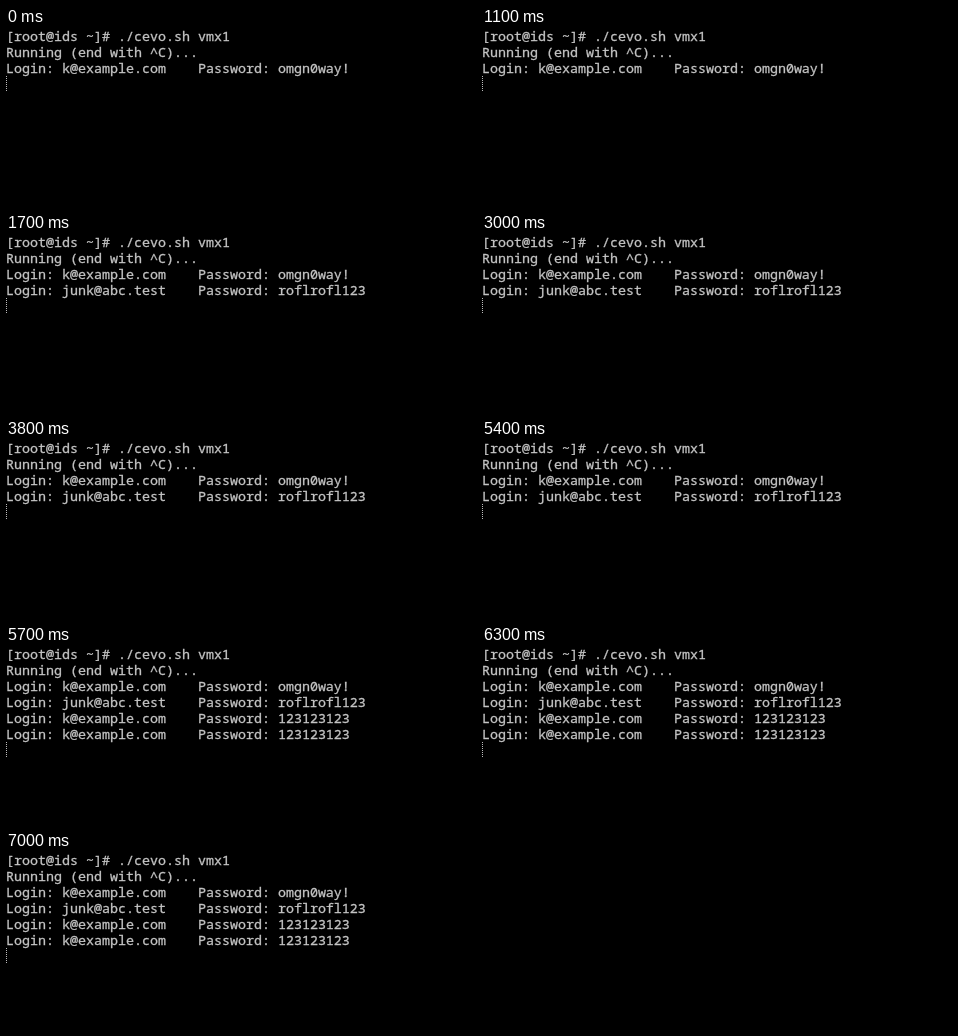
Animation, 470 px wide and 178 px high, one loop 7.1 s. Source, as an HTML page:

```html
<!DOCTYPE html>
<html lang="en">
<head>
<meta charset="utf-8">
<title>Terminal</title>
<style>
  html, body { margin: 0; width: 100%; height: 100%; overflow: hidden; background: #000; }
  svg { display: block; width: 470px; height: 178px; }
  text {
    font: 13.333px "Noto Sans Mono", "Liberation Mono", monospace;
    font-variant-ligatures: none;
    white-space: pre;
    fill: #c4c4c4;
    stroke: #c4c4c4;
    stroke-width: .3px;
  }
  .second { animation: second 7.1s step-end infinite; }
  .last { animation: last 7.1s step-end infinite; }
  .cursor { stroke: #bbb; stroke-dasharray: 1 1; animation: cursor 7.1s step-end infinite; }

  @keyframes second {
    0% { visibility: hidden; }
    23.94%, 100% { visibility: visible; }
  }
  @keyframes last {
    0% { visibility: hidden; }
    80.28%, 100% { visibility: visible; }
  }
  /* The cursor drops below the newest line. */
  @keyframes cursor {
    0% { transform: translateY(48px); }
    23.94% { transform: translateY(64px); }
    80.28%, 100% { transform: translateY(96px); }
  }
</style>
</head>
<body>
<svg viewBox="0 0 470 178">
  <text y="13">[root@ids ~]# ./cevo.sh vmx1</text>
  <text y="29">Running (end with ^C)...</text>
  <text y="45">Login: k@example.com    Password: omgn0way!</text>
  <text y="61" class="second">Login: junk@abc.test    Password: roflrofl123</text>
  <g class="last">
    <text y="77">Login: k@example.com    Password: 123123123</text>
    <text y="93">Login: k@example.com    Password: 123123123</text>
  </g>
  <line class="cursor" x1=".5" y1="0" x2=".5" y2="16"/>
</svg>
</body>
</html>
```
